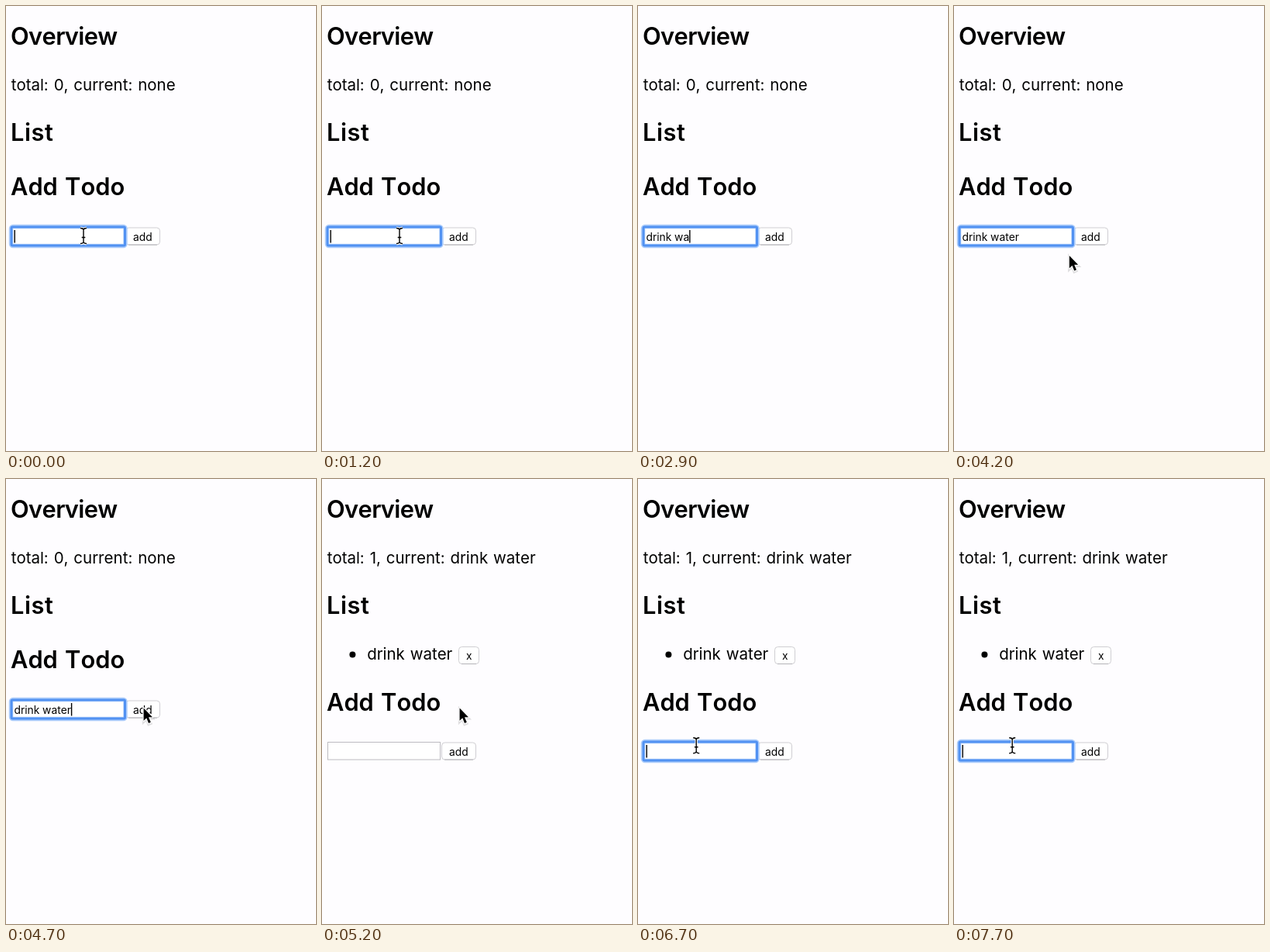
Recreate the animation shown at these times as an HTML page. Size 400 by 574 pixels, loop 8000 ms.

```html
<!DOCTYPE html>
<html lang="en">
<head>
<meta charset="utf-8">
<title>Todo</title>
<style>
  html, body { margin: 0; width: 100%; height: 100%; overflow: hidden; background: #fefdff; }
  svg { display: block; width: 400px; height: 574px; }
  text {
    font: 20.5px Inter, "Liberation Sans", sans-serif;
    font-optical-sizing: none; font-kerning: none; word-spacing: 1.1px;
    white-space: pre; fill: #000;
  }
  .head { font-size: 30.8px; font-weight: 600; word-spacing: 1.5px; }
  .ui { font-size: 13.8px; word-spacing: 0; }
  .mid { text-anchor: middle; }
  .btn { fill: #fff; stroke: #cfced2; }
  .btnEdge { stroke: #b4b3b8; fill: none; }
  .field { fill: #fff; stroke: #bcbbc0; }
  .ring { fill: none; stroke: #5292f2; stroke-width: 3; }
  .glow { fill: none; stroke: #b0cffb; stroke-width: 5.5; }
  .under { fill: #fff; stroke: #fff; stroke-linejoin: round; }
  .beam { fill: none; stroke: #000; stroke-width: 1.4; }
</style>
</head>
<body>
<svg viewBox="0 0 400 574">
  <defs>
    <path id="arrowShape" d="M0 0V16.2L3.7 12.7L6.4 19.4L9.2 18.2L6.4 11.7H11.4Z"/>
    <path id="beamShape" d="M-4 -10Q-.8 -10 0 -8Q.8 -10 4 -10M0 -8V8M-4 10Q-.8 10 0 8Q.8 10 4 10M-2.3 2H2.3"/>
  </defs>

  <text class="head" x="6" y="50" letter-spacing="-.6">Overview</text>
  <text id="summary" x="6.7" y="109"></text>
  <text class="head" x="6" y="174" letter-spacing=".5">List</text>

  <g id="item">
    <circle cx="39.4" cy="226.5" r="4"/>
    <text x="58.2" y="233">drink water</text>
    <rect class="btn" x="176.5" y="216.5" width="26" height="22" rx="4"/>
    <path class="btnEdge" d="M180 238.5H199"/>
    <text class="ui mid" x="189.7" y="233">x</text>
  </g>

  <text id="addHead" class="head" x="6" y="244">Add Todo</text>

  <g id="form">
    <rect class="btn" x="154.5" y="286" width="44" height="22" rx="4"/>
    <path class="btnEdge" d="M158 308H195"/>
    <text class="ui mid" x="176.3" y="302.5">add</text>
    <rect class="field" x="7.5" y="285.5" width="145" height="22.5"/>
    <g id="focus">
      <rect class="glow" x="6.5" y="284.5" width="147.5" height="25" rx="2.5"/>
      <rect class="ring" x="7" y="285" width="146.5" height="24" rx="1.5"/>
    </g>
    <text id="typed" class="ui" x="10.5" y="302.5"></text>
    <rect id="caret" y="289" width="1.4" height="16.5"/>
  </g>

  <g id="arrow">
    <use href="#arrowShape" y="1.5" fill="none" stroke="#000" stroke-width="3.5" opacity=".12"/>
    <use href="#arrowShape" class="under" stroke-width="2.4"/>
    <use href="#arrowShape"/>
  </g>
  <g id="beam">
    <use href="#beamShape" fill="none" stroke="#fff" stroke-width="3.4"/>
    <use href="#beamShape" class="beam"/>
  </g>
</svg>
<script>
  const LOOP = 8000, STEP = 100;
  const ADDED = 5200, REFOCUS = 6700, BLINK = 500;
  const PHRASE = "drink water";
  const KEYS = [1300, 1500, 1600, 1800, 2300, 2600, 2700, 2900, 3400, 3500, 3600];
  const LAST_KEY = 3700;

  // [time, x, y, pointer kind]
  const POINTER = [
    [0, 100, 296.5, "beam"],
    [1300, 0, 0, ""],
    [4100, 100, 297, "beam"],
    [4200, 148.8, 322, "arrow"],
    [4300, 152, 323, "arrow"],
    [4400, 159, 317, "arrow"],
    [4500, 168, 306, "arrow"],
    [4600, 175, 298, "arrow"],
    [4700, 177.6, 295.6, "arrow"],
    [5400, 174, 298, "arrow"],
    [5500, 160, 308, "arrow"],
    [5600, 136, 321, "arrow"],
    [5700, 111, 332, "arrow"],
    [5800, 90, 340, "beam"],
    [5900, 79, 343, "beam"],
    [6000, 75.2, 343.8, "beam"]
  ];

  const $ = id => document.getElementById(id);
  const show = (id, on) => $(id).style.display = on ? "" : "none";
  const move = (id, x, y) => $(id).setAttribute("transform", `translate(${x} ${y})`);
  const setText = (id, s) => { if ($(id).textContent !== s) $(id).textContent = s; };

  // Blinking restarts at focus and at every key press
  function caretOn(t) {
    if (t >= ADDED && t < REFOCUS) return false;
    let from = 0;
    for (const k of [...KEYS, LAST_KEY, REFOCUS]) if (k <= t) from = k;
    return Math.floor((t - from) / BLINK) % 2 === 0;
  }

  function drawPointer(t) {
    const [, x, y, kind] = POINTER.filter(p => p[0] <= t).pop();
    for (const id of ["arrow", "beam"]) show(id, id === kind);
    if (kind) move(kind, x, y);
  }

  function draw(t) {
    const added = t >= ADDED;
    setText("summary", added ? `total: 1, current: ${PHRASE}` : "total: 0, current: none");
    show("item", added);
    move("addHead", 0, added ? 55 : 0);
    move("form", 0, added ? 54 : 0);
    show("focus", !added || t >= REFOCUS);

    const count = added ? 0 : KEYS.filter(k => k <= t).length;
    setText("typed", PHRASE.slice(0, count));
    const width = count ? $("typed").getComputedTextLength() : 0;
    $("caret").setAttribute("x", 10.5 + width);
    show("caret", caretOn(t));

    drawPointer(t);
  }

  const start = performance.now();
  function tick() {
    const t = (performance.now() - start) % LOOP;
    draw(Math.floor(t / STEP) * STEP);
    requestAnimationFrame(tick);
  }
  tick();
</script>
</body>
</html>
```
